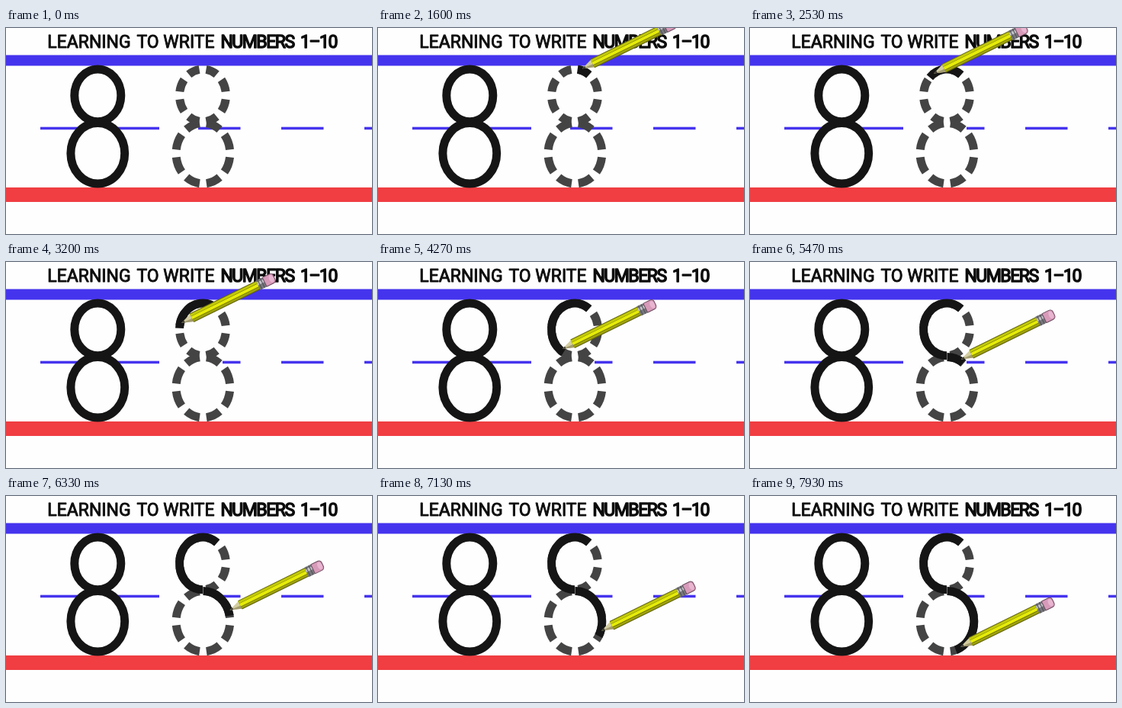
An HTML page with a canvas for the animation above (8 s loop, 480 px wide and 270 px high).

```html
<!DOCTYPE html>
<html lang="en">
<head>
<meta charset="utf-8">
<title>Learning to write numbers</title>
<style>
html, body { margin: 0; width: 100%; height: 100%; overflow: hidden; background: #fefefe; }
canvas { display: block; width: 480px; height: 270px; }
</style>
</head>
<body>
<canvas id="stage" width="480" height="270"></canvas>
<script>
const ctx = document.getElementById('stage').getContext('2d');
const LOOP = 8000, PENCIL_IN = 1270, CLEAN_AT = 2070;
const INK = '#151515', DASH = '#444', BLUE = '#4534ee', PAPER = '#fefefe';
const STROKE = 11, DASHES = 8, GAP = 9.5;

// Loops of the figure 8; angles are degrees from the top.
const upper = { y: 88.4, rx: 30.5, ry: 34.4 };
const lower = { y: 164.3, rx: 35.4, ry: 39.7 };
const rad = deg => deg * Math.PI / 180;

function rect(x, y, w, h, color) {
  ctx.fillStyle = color;
  ctx.fillRect(x, y, w, h);
}

// Positive angles run to the right; dir -1 mirrors them to the left.
function arc(o, cx, from, to, color, dir = 1) {
  ctx.beginPath();
  ctx.ellipse(cx, o.y, o.rx, o.ry, 0, rad(dir * from - 90), rad(dir * to - 90), dir < 0);
  ctx.lineWidth = STROKE;
  ctx.strokeStyle = color;
  ctx.stroke();
}

function dashedLoop(o, cx) {
  const step = 360 / DASHES, half = GAP / (o.rx + o.ry) * 180 / Math.PI;
  for (let a = 0; a < 360; a += step) arc(o, cx, a + half, a + step - half, DASH);
}

// Point on the writing path: upper loop leftwards to 180, then lower loop rightwards.
function pathPoint(s, cx) {
  const o = s < 180 ? upper : lower;
  const a = rad(s < 180 ? -s : s - 180);
  return [cx + o.rx * Math.sin(a), o.y - o.ry * Math.cos(a)];
}

// Steady sweep, slightly ahead in the middle.
function sweep(t) {
  const u = (t - 1600) / 6330;
  return -15 + 348 * u + 12 * Math.sin(Math.PI * u) ** 2;
}

function title() {
  ctx.font = '23px Roboto, "Open Sans", sans-serif';
  ctx.textAlign = 'center';
  ctx.lineJoin = 'round';
  ctx.fillStyle = ctx.strokeStyle = '#0c0c0c';
  const word = (s, x) => {
    ctx.fillText(s, x, 26.3);
    ctx.strokeText(s, x, 26.3);
  };
  ctx.lineWidth = 0.9;
  ctx.letterSpacing = '0px';
  word('LEARNING', 109);
  word('TO', 186);
  word('WRITE', 240);
  ctx.lineWidth = 1.5;
  ctx.letterSpacing = '-1.5px';
  word('NUMBERS', 329.5);
  word('1–10', 410);
}

function poly(color, ...points) {
  ctx.beginPath();
  points.forEach(([x, y]) => ctx.lineTo(x, y));
  ctx.fillStyle = color;
  ctx.fill();
}

function pencil(x, y) {
  ctx.save();
  ctx.translate(x, y);
  ctx.rotate(rad(-26.2));

  poly('#d3cda0', [0, 0], [17, -6], [17, 6]);
  poly('#a39b70', [0, 0], [17, 1], [17, 6]);
  poly('#3c3a32', [0, 0], [4.5, -1.6], [4.5, 1.6]);

  rect(15, -6.4, 98, 12.8, '#63650f');
  rect(15, -5.4, 98, 3, '#c3ca08');
  rect(15, -2, 98, 4, '#e6ec08');
  rect(15, 2.6, 98, 2.6, '#a0a408');

  rect(112, -6.8, 10, 13.6, '#77777c');
  rect(112, -4, 10, 4, '#c2c2c8');
  for (let r = 114; r < 122; r += 4) rect(r, -6.8, 1, 13.6, '#4e4e55');

  ctx.beginPath();
  ctx.roundRect(121.5, -6.6, 14, 13.2, [1, 4, 4, 1]);
  ctx.fillStyle = '#d79ab9';
  ctx.fill();
  ctx.lineWidth = 1;
  ctx.strokeStyle = '#6d4c61';
  ctx.stroke();
  ctx.beginPath();
  ctx.ellipse(131.5, 0, 3, 5, 0, 0, 2 * Math.PI);
  ctx.fillStyle = '#e8b5d0';
  ctx.fill();
  ctx.restore();
}

function lines(t) {
  rect(0, 35.5, 480, 14, BLUE);
  rect(0, 209, 480, 19, '#f03e42');
  const midline = (x, w) => rect(x, 129.7, w, 3.5, BLUE);
  midline(45, 156);
  for (let x = 252; x < 480; x += 109) midline(x, 55.5);
  rect(100, 129, 42, 5, PAPER);
  if (t >= CLEAN_AT) rect(250, 129, 34, 5, PAPER);
}

function draw(t) {
  rect(0, 0, 480, 270, PAPER);
  title();
  lines(t);

  arc(upper, 120.3, 0, 360, INK);
  arc(lower, 120.3, 0, 360, INK);
  dashedLoop(upper, 258);
  dashedLoop(lower, 258.4);
  if (t < PENCIL_IN) return;

  const s = sweep(t), ink = s + 8;
  arc(upper, 258, -38, Math.min(ink, 180), INK, -1);
  if (ink > 180) arc(lower, 258.4, 0, ink - 180, INK);
  const [x, y] = pathPoint(s, 258);
  pencil(x + 2, y - 2);
}

const began = performance.now();
function frame() {
  draw((performance.now() - began) % LOOP);
  requestAnimationFrame(frame);
}
frame();
</script>
</body>
</html>
```
